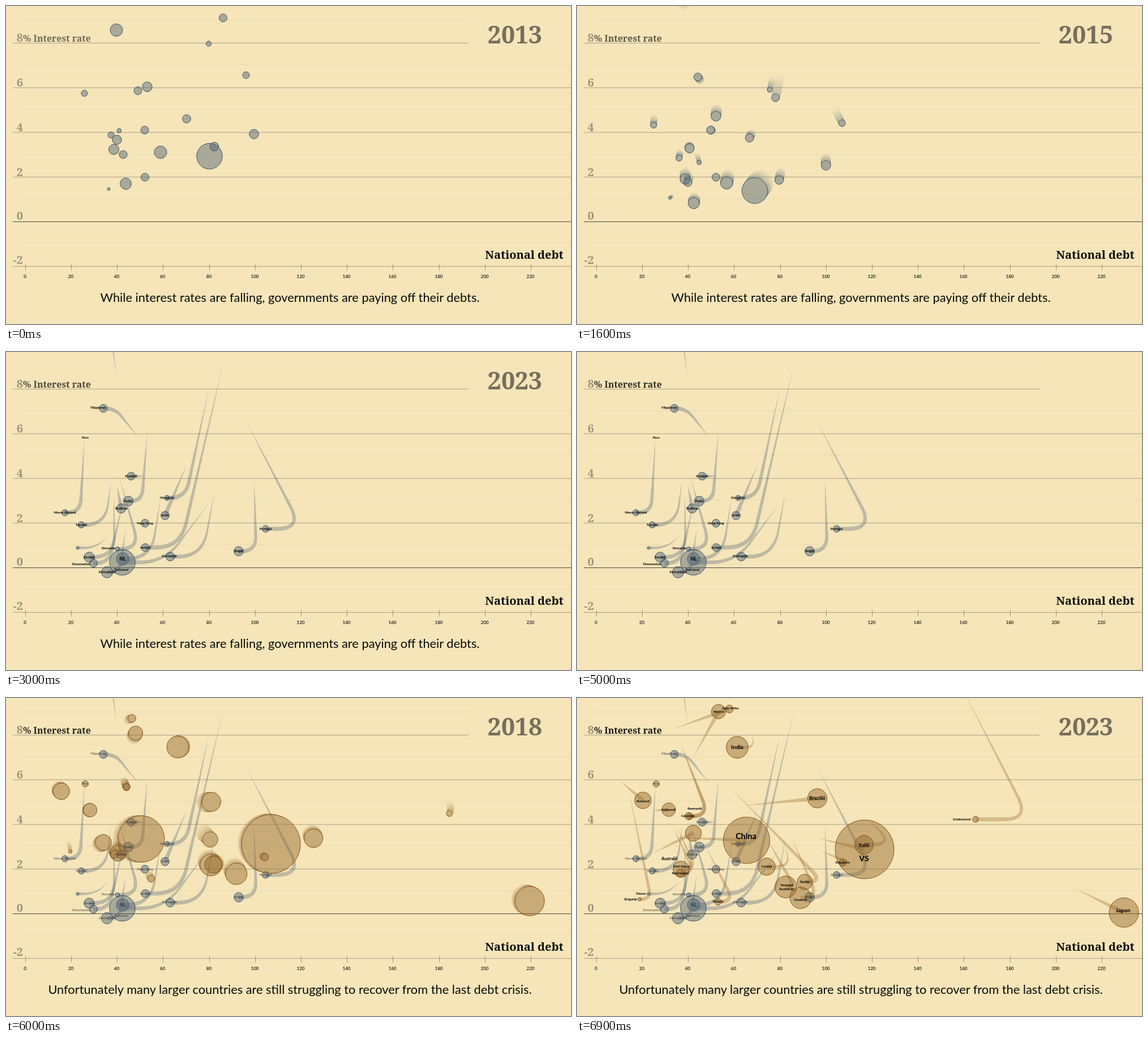
Animation, 998 px wide and 561 px high, one loop 8000 ms. Source, as an HTML page with a canvas:

```html
<!DOCTYPE html>
<html lang="en">
<head>
<meta charset="utf-8">
<title>Interest rate and national debt</title>
<style>
  html, body { margin: 0; width: 100%; height: 100%; overflow: hidden; background: #f5e5b9; }
  svg, canvas { position: absolute; left: 0; top: 0; width: 998px; height: 561px; }
  text { font-family: Lato, sans-serif; }
  .slab { font-family: "Noto Serif", serif; font-weight: 600; }
  .name { font-weight: 800; text-anchor: middle; fill: #0c0c0a; }
</style>
</head>
<body>
<svg id="back" viewBox="0 0 998 561"></svg>
<canvas id="stage" width="998" height="561"></canvas>
<svg id="front" viewBox="0 0 998 561"></svg>
<script>
const LOOP = 8000, STEP = 100;
const back = document.getElementById('back');
const front = document.getElementById('front');
const ctx = document.getElementById('stage').getContext('2d');
const clamp = v => Math.max(0, Math.min(1, v));

function add(parent, tag, attrs, text) {
  const el = document.createElementNS('http://www.w3.org/2000/svg', tag);
  for (const k in attrs) el.setAttribute(k, attrs[k]);
  if (text) el.textContent = text;
  parent.append(el);
  return el;
}

// Bubbles: name, radius, start x y, end x y, optional x of the bend at end height
const falling = [
  ['', 11, 195, 42.5, 174, -120],
  ['Ierland', 7, 383.5, 21, 246, 345, 308],
  ['Hongarije', 4.6, 358, 66.5, 284.5, 257.5, 317],
  ['Portugal', 6, 424, 122, 458.5, 312, 523],
  ['Nieuw-Zeeland', 5.5, 138.5, 154, 104, 283.5, 131],
  ['Filippijnen', 7, 233, 149.5, 172, 99.5, 192.6],
  ['Polen', 8.7, 249.5, 142.5, 216, 263, 240],
  ['Israël', 7.3, 319, 199, 281, 288.5],
  ['Maleisië', 7, 245, 219, 221, 219],
  ['Slowakije', 3.8, 200, 220, 197, 347.5, 236],
  ['Tsjechië', 5.5, 185.5, 227.5, 133, 305, 175.5],
  ['Thailand', 8.2, 196, 236, 203.5, 276],
  ['Zweden', 9, 190.5, 253, 147, 362, 191.5],
  ['Denemarken', 7, 207, 262, 154.5, 372.5, 182],
  ['NL', 11, 273, 258, 206, 365, 256],
  ['Duitsland', 22.7, 359.5, 265, 205.5, 371, 280],
  ['Oostenrijk', 7.7, 368, 248, 290, 361, 347],
  ['België', 8.3, 438, 226, 411, 351.5, 442],
  ['Hong Kong', 7, 245.5, 302, 245.5, 302],
  ['Zwitserland', 10, 211.5, 313.5, 178.5, 388.5, 200],
  ['', 2.5, 181.5, 323, 126.5, 345.5, 161]
];
const large = [
  ['VS', 52, 424, 247, 508, 267],
  ['China', 41, 172, 246, 299.5, 251],
  ['Japan', 26, 880, 336, 966, 378.5],
  ['India', 19.3, 309, 68, 283, 87, 314],
  ['Brazilië', 17, 294, 190, 424.5, 177],
  ['Italië', 16.5, 512, 213, 507, 259, 562],
  ['VK', 19.3, 334, 245, 369, 333.5, 384],
  ['Frankrijk', 19, 380, 248, 395, 352.5, 425],
  ['Canada', 15.3, 366, 262, 335, 297.5, 381],
  ['Rusland', 14.7, 77, 147, 116.5, 180.5],
  ['Zuid-Korea', 14.3, 177, 229, 184, 302, 211],
  ['Australië', 14.2, 135, 273, 205.5, 238.5]
];
const small = [
  ['Mexico', 12.6, 206, 104, 250, 24],
  ['Spanje', 13.6, 271, 158, 402.5, 324.5, 434],
  ['Indonesië', 12, 134, 198.5, 162, 197],
  ['Zuid-Afrika', 7, 171, 54, 269, 19.5],
  ['Peru', 5.5, 140, 151.5, 140, 151.5],
  ['Colombia', 6.5, 183, 81, 197, 208.5, 233],
  ['Roemenië', 5.5, 184, 82, 199.5, 208.5, 233],
  ['Griekenland', 5.3, 681, -16, 704, 214, 799],
  ['Noorwegen', 7.2, 170, 227, 182.5, 309, 207],
  ['Bulgarije', 3, 92, 165, 110.5, 355, 131],
  ['Finland', 6, 227, 261, 249, 359.5, 277],
  ['Singapore', 6.5, 430, 269, 469, 290.5, 480]
];

// Label placement where it differs: dx, dy, size
const place = {
  Filippijnen: [-9.5, -1], Slowakije: [-16, -1], Denemarken: [-21.5, 1.5],
  Oostenrijk: [-1.5, -1], NL: [0, 0, 8.8], Duitsland: [-1.5, 13],
  VS: [-1, 16, 14], China: [-1, -7.5, 14.3], Japan: [-1.5, -4.5, 10],
  India: [0, 0, 9.9], 'Brazilië': [0, 0, 8.6], 'Italië': [0, 1, 8.4],
  Frankrijk: [0, 4], Rusland: [0, 1, 6.4], 'Zuid-Korea': [0, -5],
  'Australië': [-42, 45.5, 7.1], 'Zuid-Afrika': [2, -1], 'Roemenië': [8.5, -13],
  Griekenland: [-24.5, 0], Bulgarije: [-15.5, 0], Colombia: [-1, 0]
};

// Straight run, rounded bend, level run; sampled evenly by length
function route(x0, y0, x1, y1, cx = x1) {
  const run = Math.hypot(cx - x0, y1 - y0), level = x1 - cx;
  const r = Math.min(44, run * .8, Math.abs(level) * .87);
  const raw = [[x0, y0]];
  if (r > 0) {
    const ax = (x0 - cx) / run * r, ay = (y0 - y1) / run * r, bx = Math.sign(level) * r;
    for (let i = 0; i <= 20; i++) {
      const u = i / 20, v = (1 - u) ** 2;
      raw.push([cx + ax * v + bx * u * u, y1 + ay * v]);
    }
  }
  raw.push([x1, y1]);
  const dist = [0];
  for (let i = 1; i < raw.length; i++)
    dist.push(dist[i - 1] + Math.hypot(raw[i][0] - raw[i - 1][0], raw[i][1] - raw[i - 1][1]));
  const total = dist[dist.length - 1];
  return u => {
    const d = clamp(u) * total;
    let i = 1;
    while (i < raw.length - 1 && dist[i] < d) i++;
    const f = (d - dist[i - 1]) / (dist[i] - dist[i - 1] || 1);
    return raw[i - 1].map((a, k) => a + (raw[i][k] - a) * f);
  };
}

const bubble = ([name, r, x0, y0, x1, y1, cx]) => ({
  name, r, x1, y1,
  still: x0 === x1 && y0 === y1,
  at: route(x0, y0, x1, y1, cx),
  bend: name === 'Griekenland' ? .45 : 1
});

function makeGroup(rows, fill, line, start, span) {
  return { items: rows.map(bubble), fill, line, start, span, names: add(front, 'g', {}) };
}
const blue = makeGroup(falling, '77,98,115', '52,74,96', 970, 1667);
const brown = makeGroup([...large, ...small], '149,103,42', '124,76,20', 5040, 1830);

function label(g, text, x, y, size = 5.7) {
  add(g, 'text', { class: 'name', x, y: y + size * .35, 'font-size': size }, text);
}
for (const g of [blue, brown]) for (const b of g.items) {
  if (!b.name || b.name === 'VK' || b.name === 'Peru') continue;
  const [dx, dy, size] = place[b.name] || [0, 0];
  label(g.names, b.name, b.x1 + dx, b.y1 + dy, size);
}
label(blue.names, 'Peru', 140, 151);
label(brown.names, 'Taiwan', 113, 345.5);
label(brown.names, 'Verenigd', 370.5, 330.5);
label(brown.names, 'Koninkrijk', 370.5, 337.5);

// Grid and axes
for (let v = -2; v <= 9; v++) {
  const minor = v % 2, y = 380.6 - 39.4 * v - (minor ? 1.5 : 0);
  add(back, 'path', {
    d: `M${minor ? 28 : 12} ${y}H${v > 7 ? 817 : 998}`,
    stroke: v ? '#4b473b' : '#35322a',
    'stroke-opacity': minor ? .07 : v ? .45 : .9
  });
  if (!minor) add(back, 'text', {
    class: 'slab', x: 30, y: y - (v > 0 ? 2 : 4), 'font-size': 20,
    'text-anchor': 'end', fill: '#9c937a'
  }, String(v));
}
for (let v = 0; v <= 220; v += 20) {
  const x = Math.floor(34.4 + 4.06 * v) + .5;
  add(back, 'path', { d: `M${x} 455.5V466.5`, stroke: '#4b473b', 'stroke-opacity': .5 });
  add(back, 'text', {
    x: x - 1, y: 480, 'font-size': 8.1, 'font-weight': 600, 'text-anchor': 'middle', fill: '#15140f'
  }, String(v));
}
const rate = add(back, 'text', { class: 'slab', x: 30, y: 63.3, 'font-size': 15.9, fill: '#11100c' }, '% Interest rate');
add(front, 'text', { class: 'slab', x: 984.5, y: 446, 'font-size': 20, 'text-anchor': 'end', fill: '#0c0b08' }, 'National debt');
const year = add(front, 'text', { class: 'slab', x: 947, y: 65.5, 'font-size': 43, 'text-anchor': 'end', fill: '#776f5c' }, '2013');
const caption = add(front, 'text', { x: 501.5, y: 522, 'font-size': 21.8, 'text-anchor': 'middle', fill: '#0a0a08' }, ' ');

function trail(b, rgb, alpha) {
  const n = 60, left = [], right = [], wide = Math.min(7.2, b.r * 2);
  for (let i = 0; i <= n; i++) {
    const u = i / n, [x, y] = b.at(u);
    const p = b.at(u - .01), q = b.at(u + .01);
    const dx = q[0] - p[0], dy = q[1] - p[1], len = Math.hypot(dx, dy) || 1;
    const h = wide / 2 * Math.min(1, u * 1.1);
    left.push([x - dy / len * h, y + dx / len * h]);
    right.unshift([x + dy / len * h, y - dx / len * h]);
  }
  ctx.beginPath();
  for (const p of left.concat(right)) ctx.lineTo(...p);
  ctx.fillStyle = `rgba(${rgb},${.33 * alpha})`;
  ctx.fill();
}

function disc([x, y], r, g, fill, line) {
  ctx.beginPath();
  ctx.arc(x, y, r, 0, Math.PI * 2);
  ctx.fillStyle = `rgba(${g.fill},${fill})`;
  ctx.fill();
  ctx.strokeStyle = `rgba(${g.line},${line})`;
  ctx.lineWidth = 1;
  ctx.stroke();
}

// Fading echoes, kept outside the bubble itself so its tone stays even
function echoes(b, g, pos, t, alpha) {
  const [x, y] = pos(b, t);
  ctx.save();
  ctx.beginPath();
  ctx.rect(0, 0, 998, 561);
  ctx.moveTo(x + b.r, y);
  ctx.arc(x, y, b.r, 0, Math.PI * 2);
  ctx.clip('evenodd');
  for (let k = 8; k > 0; k--) {
    const a = (1 - k / 9) * alpha;
    disc(pos(b, t - 18 * k), b.r, g, .06 * a, .34 * a);
  }
  ctx.restore();
}

function drawGroup(g, t, shown) {
  const phase = ms => clamp((ms - g.start) / g.span);
  const moving = t >= Math.ceil(g.start / STEP) * STEP;
  const pos = (b, ms) => b.at(moving ? phase(ms) ** b.bend : 0);
  if (shown > 0) for (const b of g.items) if (!b.still) trail(b, g.fill, shown);
  for (const b of g.items) {
    if (moving && shown < 1 && !b.still) echoes(b, g, pos, t, 1 - shown);
    disc(pos(b, t), b.r, g, .46, .9);
  }
}

function render(t) {
  const second = t >= 5100;
  const blueShown = clamp((t - 2500) / 500);
  const brownShown = clamp((t - 6400) / 500);
  ctx.clearRect(0, 0, 998, 561);
  drawGroup(blue, t, blueShown);
  if (second) drawGroup(brown, t, brownShown);
  blue.names.setAttribute('opacity', second ? .5 : blueShown);
  brown.names.setAttribute('opacity', brownShown);
  rate.setAttribute('fill-opacity', .58 + .38 * clamp(t / 6900));

  const gone = second ? 10 * clamp((t - brown.start) / brown.span)
                      : 10 * clamp((t - 1000) / 1700) ** 1.5;
  year.textContent = 2013 + Math.floor(gone);
  caption.textContent = second
    ? 'Unfortunately many larger countries are still struggling to recover from the last debt crisis.'
    : 'While interest rates are falling, governments are paying off their debts.';
  const pause = t >= 5000 && !second;
  year.setAttribute('opacity', pause ? 0 : 1);
  caption.setAttribute('opacity', pause ? 0 : 1);
}

const begin = performance.now();
let last = -1;
function tick() {
  const t = Math.floor((performance.now() - begin) % LOOP / STEP) * STEP;
  if (t !== last) render(last = t);
  requestAnimationFrame(tick);
}
tick();
</script>
</body>
</html>
```
